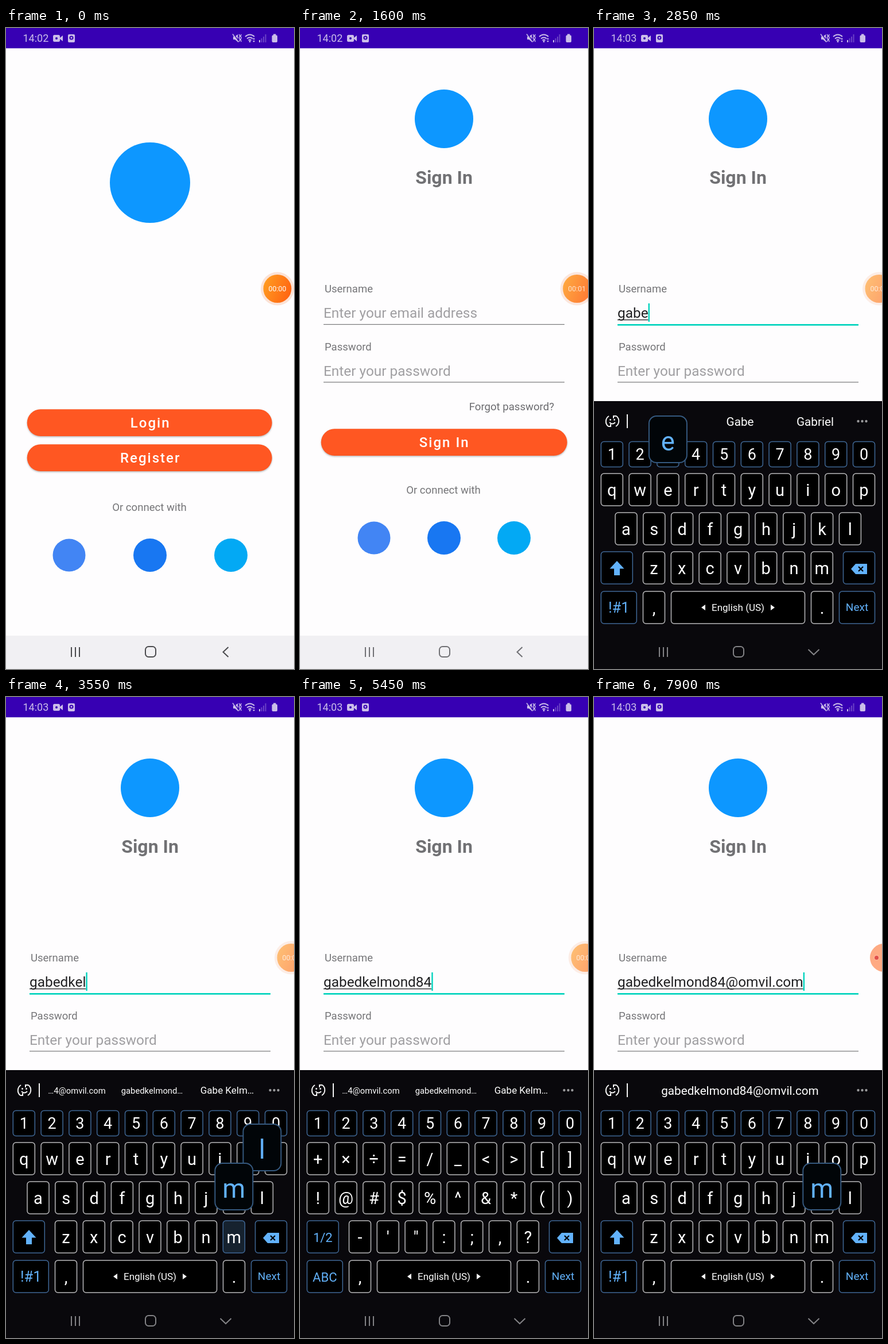
Write an HTML page with a canvas that moves like this. It is 502 px wide and 1115 px high and loops after 8000 ms.

```html
<!DOCTYPE html>
<html lang="en">
<head>
<meta charset="utf-8">
<title>Sign in</title>
<style>
html, body { margin: 0; width: 100%; height: 100%; overflow: hidden; background: #fff; }
canvas { display: block; }
</style>
</head>
<body>
<canvas id="stage" width="502" height="1115"></canvas>
<script>
const ctx = document.getElementById('stage').getContext('2d');
const LOOP = 8000, BLUE = '#62b2fb', GREY = '#757578', TEAL = '#00d3bd', ORANGE = '#ff5722';
const PURPLE = '#3700b3', KEYS_BG = '#09080c';
const EMAIL = 'gabedkelmond84@omvil.com';
// moment each character of EMAIL is entered
const TYPED = [2250, 2450, 2650, 2830, 3250, 3340, 3440, 3540, 3640, 3740, 3840, 3930,
  4650, 4980, 5650, 6250, 6500, 6650, 6800, 6960, 7400, 7550, 7700, 7850];

const clamp = v => Math.max(0, Math.min(1, v));
const during = (t, a, b) => t >= a && t < b;

function text(s, x, y, size, color, align = 'left', weight = 400, gap = 0) {
  ctx.font = `${weight} ${size}px Roboto, sans-serif`;
  ctx.letterSpacing = gap + 'px';
  ctx.textAlign = align;
  ctx.fillStyle = color;
  ctx.fillText(s, x, y);
}
function rect(x, y, w, h, color) {
  ctx.fillStyle = color;
  ctx.fillRect(x, y, w, h);
}
function round(x, y, w, h, r, fill, stroke, line = 1.5) {
  ctx.beginPath();
  ctx.roundRect(x, y, w, h, r);
  if (fill) { ctx.fillStyle = fill; ctx.fill(); }
  if (stroke) { ctx.strokeStyle = stroke; ctx.lineWidth = line; ctx.stroke(); }
}
function disc(x, y, r, color) {
  ctx.beginPath();
  ctx.arc(x, y, r, 0, 7);
  ctx.fillStyle = color;
  ctx.fill();
}
function shape(d, color) {
  ctx.fillStyle = color;
  ctx.fill(new Path2D(d));
}
function line(d, color, width = 2) {
  ctx.strokeStyle = color;
  ctx.lineWidth = width;
  ctx.stroke(new Path2D(d));
}

function button(label, y, w, lit) {
  ctx.save();
  ctx.shadowColor = 'rgba(0,0,0,.28)';
  ctx.shadowBlur = 3;
  ctx.shadowOffsetY = 1.5;
  round(36.7, y + .3, w, 46.7, 23.35, ORANGE);
  ctx.restore();
  if (lit) round(36.7, y + .3, w, 46.7, 23.35, 'rgba(255,255,255,.15)');
  text(label, 251.7, y + 32.4, 24, '#fff', 'center', 500, 2);
}
function pageBase() {
  rect(0, 0, 502, 1115, '#fefdfe');
  rect(0, 0, 502, 35.3, PURPLE);
  rect(0, 1057, 502, 58, '#f1f0f3');
}
function connect(y, spread) {
  text('Or connect with', 250, y, 18.6, GREY, 'center');
  disc(251 - spread, y + 77, 28.5, '#4285f4');
  disc(251, y + 77, 29, '#1877f2');
  disc(251 + spread, y + 77, 29, '#03a9f4');
}
function welcome(t) {
  pageBase();
  disc(251, 269, 70, '#0d97ff');
  button('Login', 663, 427, during(t, 700, 850));
  button('Register', 724, 427);
  connect(840, 141);
}
function signIn(t) {
  const count = TYPED.filter(at => at <= t).length, focus = t >= 1700;
  pageBase();
  disc(251, 158, 51, '#0d97ff');
  text('Sign In', 251, 271, 32, '#717174', 'center', 700);
  text('Username', 43, 460, 18.5, GREY);
  text('Password', 43, 561, 18.5, GREY);
  text('Enter your password', 41, 605, 24.4, '#a09fa2');
  rect(41, 615.5, 420, 1.2, '#78787a');
  rect(41, 515, 420, focus ? 2.7 : 1.2, focus ? TEAL : '#78787a');

  const entry = EMAIL.slice(0, count);
  text(entry || 'Enter your email address', 41, 504, 24.4, entry ? '#202022' : '#a09fa2');
  const width = entry ? ctx.measureText(entry).width : 0;
  if (entry) rect(41, 507, width, 1.3, '#202022');
  const since = t - (count ? TYPED[count - 1] : 1700);
  if (focus && since % 1000 < 500) rect(41 + width, 479, 2.4, 32, TEAL);

  text('Forgot password?', 443, 665, 18.6, '#6c6c70', 'right');
  button('Sign In', 697, 429);
  connect(810, 122);
}

// [label, x, y, width, height, blue outline]
function layout(symbols) {
  const keys = [];
  const row = (chars, x, y, h = 56, blue = false) =>
    [...chars].forEach((c, i) => keys.push([c, x + i * 48.8, y, 38, h, blue]));
  row('1234567890', 12.3, 719.5, 44, true);
  row(symbols ? '+×÷=/_<>[]' : 'qwertyuiop', 12.3, 775);
  if (symbols) row('!@#$%^&*()', 12.3, 843);
  else row('asdfghjkl', 37, 843);
  row(symbols ? '-\'":;,?' : 'zxcvbnm', 85.5, 911);
  row(',', 85.5, 980);
  row('.', 378.5, 980);
  keys.push([symbols ? '1/2' : 'shift', 12.3, 911, 55, 56, true], ['back', 434.5, 911, 55, 56, true],
    [symbols ? 'ABC' : '!#1', 12.3, 980, 62, 56, true], ['space', 134.5, 980, 233, 56, false],
    ['Next', 427.5, 980, 62, 56, true]);
  return keys;
}
function drawKey([label, x, y, w, h, blue], pressed) {
  const mid = x + w / 2;
  round(x, y, w, h, 5, pressed ? '#16222f' : '#000', pressed || blue ? '#3f6795' : '#b9b9bb');
  if (label === 'shift') shape('M40 927l12.5 13.5h-7.5v11.5h-10v-11.5h-7.5z', BLUE);
  else if (label === 'back') {
    shape('M448 941l8-9h20v18h-20z', BLUE);
    line('M461 937l8 8m0-8l-8 8', '#000', 2.2);
  } else if (label === 'space') {
    text('English (US)', mid, 1014, 17, '#fff', 'center');
    shape('M187 1008l7-5v10zM315 1008l-7-5v10z', '#fff');
  } else if (label.length > 1) {
    const size = label === 'Next' ? 19 : label === '!#1' ? 25.5 : 22;
    text(label, mid, size > 20 ? y + 37 : 1014, size, BLUE, 'center');
  } else text(label, mid, y + (h < 50 ? 31.5 : 39), h < 50 ? 27 : 29, '#fff', 'center');
}
function popup([label, x, y]) {
  const mid = x + 19, top = y - 100;
  round(mid - 33, top, 66, 81, 13, '#010508', '#35597f', 2);
  text(label, mid, top + 60.3, 45.5, BLUE, 'center');
}
function toolbar(count) {
  const w = '#f4f4f4';
  line('M26 675A11 11 0 0 0 25 693M29 694v-5M25 693h5M38 693A11 11 0 0 0 39 675M34 674v5M39 675h-5', w);
  if (count) {
    disc(28.5, 681.5, 1.4, w);
    disc(35.5, 681.5, 1.4, w);
    line('M27 686q5 5 10 0', w);
  } else text('T', 32, 690, 15, w, 'center', 700);
  rect(57, 672, 2, 24, w);
  for (const x of [460.5, 467.5, 474.5]) disc(x, 684, 2.2, '#98989a');

  if (!count) {
    disc(481, 672.5, 3, '#ff4a2a');
    disc(97, 684, 11.5, w);
    disc(93, 681, 1.7, '#000');
    disc(101, 681, 1.7, '#000');
    line('M91 687q6 6 12 0', '#000');
    shape('M167 673h17q3 0 3 3v11l-9 8h-11q-3 0-3-3v-16q0-3 3-3z', w);
    line('M178 695q0-8 9-8M169 684q4 6 9 1', '#000', 1.6);
    disc(171, 680, 1.5, '#000');
    disc(180, 680, 1.5, '#000');
    round(242, 673, 23, 22, 4, w);
    text('GIF', 253.5, 688, 11, '#000', 'center', 900);
    round(328, 672, 8, 15, 4, w);
    line('M323.5 682a8.5 8.5 0 0 0 17 0M332 691v5', w, 2.4);
    for (let i = 0; i < 8; i++) {
      const a = i * Math.PI / 4;
      line(`M409.5 684l${11 * Math.cos(a)} ${11 * Math.sin(a)}`, w, 5);
    }
    disc(409.5, 684, 9, w);
    disc(409.5, 684, 3.6, '#000');
    return;
  }
  const suggest = (words, sizes) => words.forEach((s, i) =>
    text(s, [123.5, 254.5, 385.5][i], sizes[i] < 18 ? 689.5 : 692, sizes[i], '#fff', 'center'));
  if (count < 5) suggest([EMAIL.slice(0, count), 'Gabe', 'Gabriel'], [20.7, 20.7, 20.7]);
  else if (count < 15) suggest(['…4@omvil.com', 'gabedkelmond…', 'Gabe Kelm…'], [14.8, 14.8, 17]);
  else if (count < 18) suggest(['Gabe', 'com', 'omvil.com'], [20.7, 20.7, 20.7]);
  else suggest(['', EMAIL], [20.7, 20.7]);
}
function keyboard(t) {
  const rise = clamp((t - 1700) / 300);
  if (!rise) return;
  const count = TYPED.filter(at => at <= t).length;
  const keys = layout(during(t, 5250, 5950));
  ctx.save();
  ctx.translate(0, (1 - rise) ** 3 * 466 + (count ? 0 : 2));
  rect(0, 649, 502, 470, KEYS_BG);
  toolbar(count);
  const active = [...EMAIL].map((c, i) => ({ c, at: TYPED[i] }))
    .filter(p => during(t, p.at - 90, p.at + 100));
  for (const key of keys) drawKey(key, active.some(p => p.c === key[0] && t < p.at));
  for (const p of active) {
    const key = keys.find(k => k[0] === p.c);
    if (key) popup(key);
  }
  ctx.restore();
}

function statusIcons(t) {
  const c = '#cbbde9', dim = 'rgba(203,189,233,.35)';
  text(t < 2400 ? '14:02' : '14:03', 29.5, 24.3, 18, c);
  round(82, 12, 12, 12, 2.5, c);
  shape('M94 17l5-4v10l-5-4z', c);
  disc(88, 18, 2, PURPLE);
  round(108, 11, 12, 14, 2, c);
  disc(114, 17, 3.6, PURPLE);
  disc(114, 17, 1.5, c);
  shape('M396 15h3l5-4v13l-5-4h-3z', c);
  line('M396.5 10l10 14', PURPLE, 1.5);
  line('M395 10.5l10 14M406 11l2 3-2 3 2 3-2 4M410 11l-1 3 1 3-1 3 1 4', c, 1.4);
  line('M417 15q8-7 16 0M420 18.5q5-4 10 0M422.5 21.5q2.5-2 5 0', c, 1.8);
  disc(425, 23.5, 1.5, c);
  shape('M430 20l2-3 2 3zM430 22l2 3 2-3z', c);
  rect(441, 21, 2, 4, c);
  rect(444.5, 18, 2, 7, dim);
  rect(448, 15, 2, 10, dim);
  rect(451.5, 11, 2, 14, dim);
  round(463.5, 12.5, 9.5, 12.5, 2, c);
  rect(466, 10.5, 4.5, 3, c);
}
function navIcons(t) {
  const c = t < 450 ? '#4a4a4d' : t < 1700 ? '#707074' : '#838386';
  line('M114 1077v17M121 1077v17M128 1077v17', c);
  round(243, 1076, 18, 18, 5.5, null, c, 2);
  line(t < 1700 ? 'M387.5 1077l-9 8.5 9 8.5' : 'M373.5 1081l9.5 9 9.5-9', c);
}
function recorder(t) {
  const idle = clamp((t - 1500) / 250), tuck = clamp((t - 5600) / 200);
  const x = 473 + 24 * idle + 8.5 * tuck, y = 453.5;
  const fill = ctx.createLinearGradient(x - 24, y - 10, x + 24, y + 10);
  fill.addColorStop(0, '#ff9b20');
  fill.addColorStop(1, '#ff6312');
  ctx.save();
  ctx.globalAlpha = 1 - .42 * idle;
  if (tuck < 1) disc(x, y, 29, '#fbe2d6');
  disc(x, y, 24.5, tuck ? '#ff6f2c' : fill);
  ctx.restore();
  if (tuck) {
    disc(492.5, y, 5, 'rgba(255,190,165,.6)');
    disc(492.5, y, 3.5, '#e0504c');
  } else {
    const seconds = Math.max(0, Math.floor((t - 450) / 1000));
    text('00:0' + seconds, x, 458, 12.4, idle ? 'rgba(255,255,255,.75)' : '#fff', 'center');
  }
}

function draw(t) {
  const p = clamp((t - 850) / 650), rest = (1 - p) ** 2;
  rect(0, 0, 502, 1115, '#000');
  if (p < 1) {
    ctx.save();
    ctx.translate(0, Math.round(-20.5 * (1 - rest)));
    welcome(t);
    rect(0, 0, 502, 1115, `rgba(0,0,0,${.08 * (1 - rest)})`);
    ctx.restore();
  }
  if (p > 0) {
    ctx.save();
    ctx.globalAlpha = Math.min(1, p * 1.825);
    ctx.translate(0, Math.round(rest * 652));
    signIn(t);
    ctx.restore();
  }
  keyboard(t);
  statusIcons(t);
  navIcons(t);
  recorder(t);
}
function frame() {
  draw(performance.now() % LOOP);
  requestAnimationFrame(frame);
}
frame();
</script>
</body>
</html>
```
